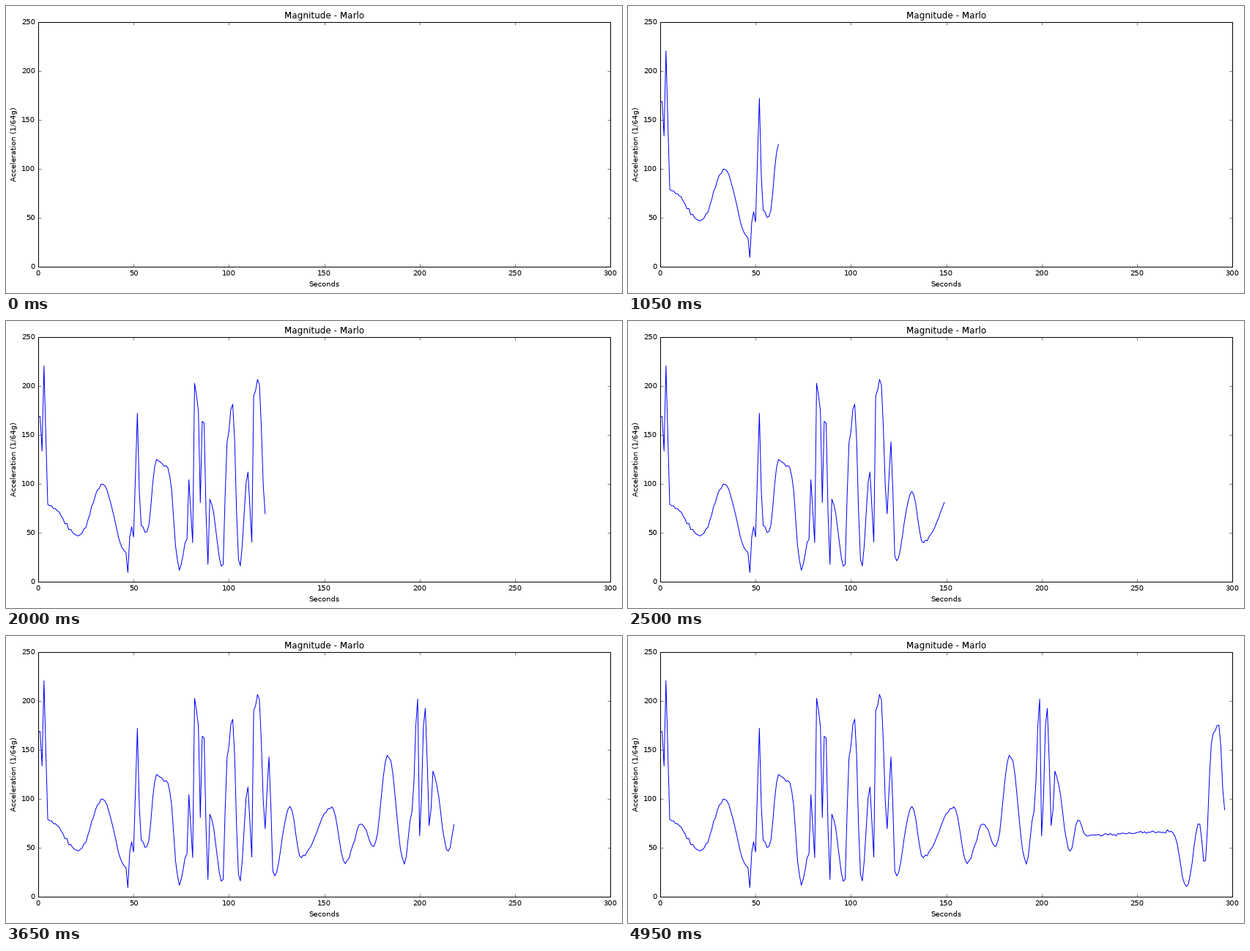
Animation of 841x393 px, one loop 5 s. Source, as a matplotlib script:

```python
import numpy as np
import matplotlib.pyplot as plt
from matplotlib.animation import FuncAnimation

W, H, DPI = 841, 393, 72
FRAMES, INTERVAL = 100, 50
SAMPLES_PER_FRAME = 3

plt.rcParams.update({
    "font.family": "DejaVu Sans",
    "text.hinting": "default",
    "axes.titlepad": 5, "axes.labelpad": 5,
    "axes.linewidth": 1, "axes.axisbelow": False,
    "savefig.dpi": "figure",
})
for axis, far_side in (("xtick", "top"), ("ytick", "right")):
    plt.rcParams.update({
        f"{axis}.direction": "in", f"{axis}.{far_side}": True,
        f"{axis}.major.size": 4, f"{axis}.major.width": 0.5,
        f"{axis}.major.pad": 4, f"{axis}.alignment": "center",
    })

# Turning points of the signal: (second, magnitude)
KNOTS = [
    (1, 169), (2, 132), (3, 220), (5, 79), (21.5, 47), (33.7, 100),
    (46, 30), (47, 9.5), (48.6, 59), (50, 46), (52, 173), (53.6, 58),
    (57, 50), (62, 124), (68, 117), (74, 12), (78, 45), (79, 106),
    (81, 40), (82, 202), (84, 175), (85, 80), (86.4, 184), (89, 19),
    (90, 85), (96.8, 12), (99, 142), (101.8, 184), (105.5, 12), (110, 112),
    (112, 40), (113, 190), (115.6, 208), (119, 71), (121, 143), (123.3, 17),
    (132, 92), (138, 40), (154, 92), (161, 34), (169.5, 75), (176, 50),
    (183.5, 147), (192, 33.5), (196, 86), (199, 202), (200, 63),
    (202.8, 198), (205.3, 68), (207, 128), (215, 45), (219, 78), (223, 63),
    (269, 66), (276, 9), (282.8, 76), (285.5, 31), (289.6, 166), (293, 174),
    (296, 89),
]


def eased_curve(knots, t):
    """Join the knots, slowing down near each of them."""
    x, y = np.transpose(knots)
    order = np.arange(len(knots))
    u = np.interp(t, x, order)
    u -= 0.1 * np.sin(2 * np.pi * u)
    return np.interp(u, order, y)


seconds = np.arange(FRAMES * SAMPLES_PER_FRAME)
ripple = np.random.default_rng(4).normal(scale=0.9, size=seconds.size)
magnitude = eased_curve(KNOTS, seconds) + ripple

fig = plt.figure(figsize=(W / DPI, H / DPI), dpi=DPI, facecolor="white")
ax = fig.add_axes([44 / W, 36 / H, 781 / W, 335 / H])
ax.set(xlim=(0, 300), ylim=(0, 250), title="Magnitude - Marlo",
       xlabel="Seconds", ylabel="Acceleration (1/64g)")
line, = ax.plot([], [], color="blue", linewidth=1)


def update(frame):
    shown = frame * SAMPLES_PER_FRAME
    line.set_data(seconds[:shown], magnitude[:shown])
    return line,


def reset():
    return update(0)


anim = FuncAnimation(fig, update, frames=FRAMES, init_func=reset,
                     interval=INTERVAL, repeat=True)
plt.show()
```
